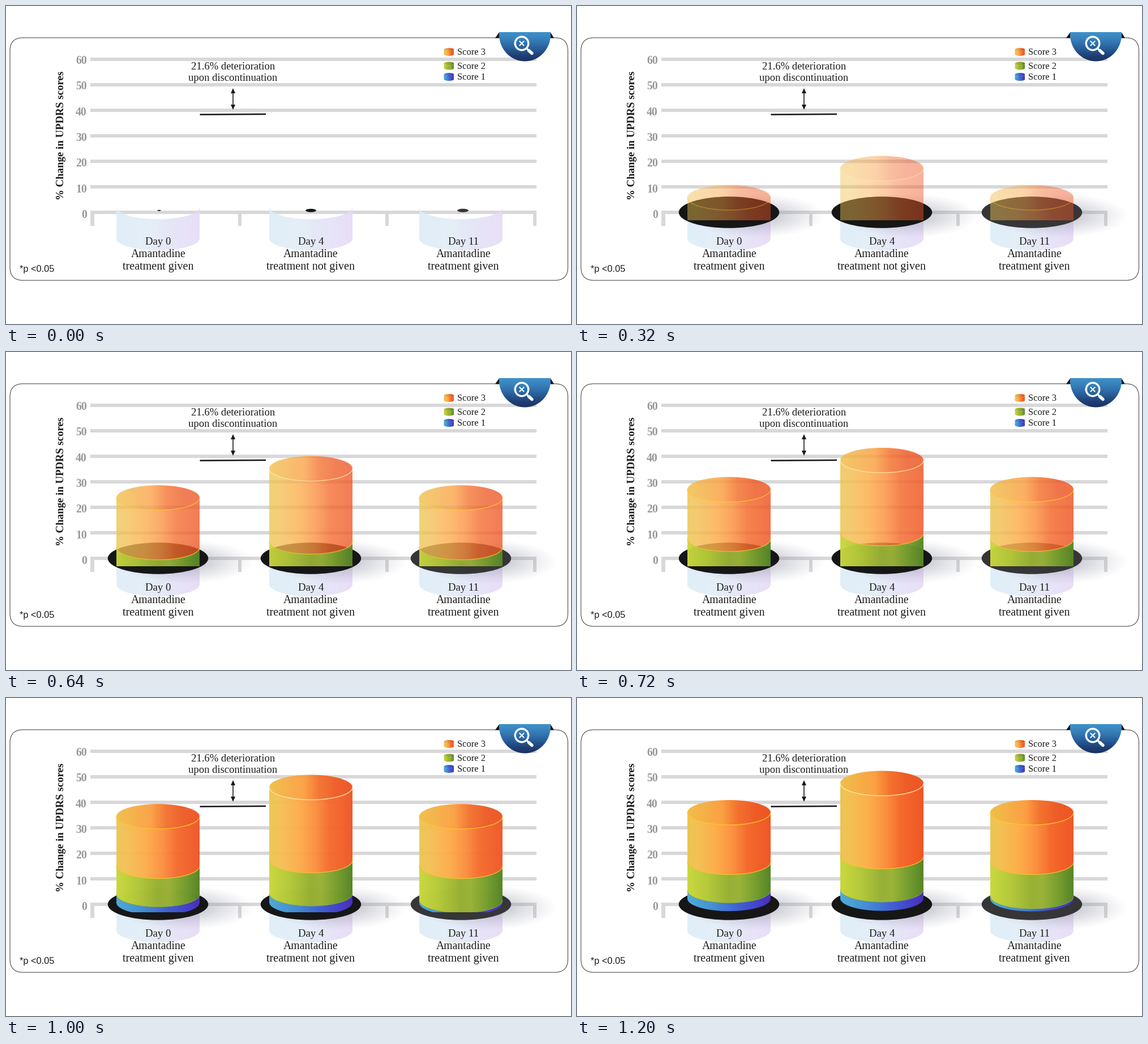
Animation, 998 px wide and 561 px high, one loop 8000 ms. Source, as a matplotlib script:

```python
import numpy as np
import matplotlib.pyplot as plt
from matplotlib.animation import FuncAnimation
from matplotlib.colors import LinearSegmentedColormap
from matplotlib.patches import Ellipse, FancyBboxPatch, Polygon, Rectangle
from matplotlib.path import Path

W, H, DPI = 998, 561, 64
PT = 72 / DPI                     # points per pixel
STEP, LOOP, RISE = 40, 8000, 1200
FLOOR = 378                       # bars are cut off below this line
HALF, TILT = 73.5, 22             # radii of a bar's ellipse
LIFT = 253                        # how far the bars travel
GRID = "#d8d8d9"
INK = "#1b1a1b"

fig = plt.figure(figsize=(W / DPI, H / DPI), dpi=DPI, facecolor="white")
ax = fig.add_axes([0, 0, 1, 1])
ax.set_xlim(0, W)
ax.set_ylim(H, 0)
ax.set_autoscale_on(False)
ax.axis("off")


def ramp(*stops):
    """A one-row RGB gradient from (position, colour) stops."""
    cmap = LinearSegmentedColormap.from_list("ramp", stops, N=256)
    return cmap(np.linspace(0, 1, 256))[None, :, :3]


ORANGE = ramp((0, "#ecc650"), (0.12, "#f3c155"), (0.35, "#fdae4b"),
              (0.55, "#fb9040"), (0.72, "#f56b2d"), (1, "#ef5626"))
ORANGE_TOP = ramp((0, "#f0c04a"), (0.2, "#f5b147"), (0.42, "#fba044"),
                  (0.6, "#f4722f"), (0.8, "#ee5c27"), (1, "#ee5524"))
GREEN = ramp((0, "#cad93f"), (0.25, "#b4c93b"), (0.5, "#98b035"),
             (0.62, "#9bb338"), (0.8, "#79a030"), (1, "#568527"))
BLUE = ramp((0, "#4fadd8"), (0.3, "#4590d6"), (0.6, "#3f63d4"),
            (0.85, "#4640cb"), (1, "#4a2fb6"))
MIRROR = ramp((0, "#dcecf6"), (0.4, "#e2ecf8"), (0.65, "#e3e3f6"),
              (1, "#e6daf6"))


def picture(data, left, right, top, bottom, z, **kw):
    return ax.imshow(data, extent=(left, right, bottom, top), aspect="auto",
                     zorder=z, **kw)


def clip(image, pts):
    image.set_clip_path(Path(pts), ax.transData)


def front(cx, cy, half=HALF, tilt=TILT):
    """Front half of an ellipse, left to right."""
    a = np.linspace(np.pi, 0, 60)
    return np.column_stack([cx + half * np.cos(a), cy + tilt * np.sin(a)])


def disc(cx, cy, half=HALF, tilt=TILT):
    a = np.linspace(0, 2 * np.pi, 120)
    return np.column_stack([cx + half * np.cos(a), cy + tilt * np.sin(a)])


def band(cx, upper, lower, half=HALF, tilt=TILT):
    """Visible side of a cylinder between two ellipse centres."""
    return np.vstack([front(cx, upper, half, tilt),
                      front(cx, lower, half, tilt)[::-1]])


def cut(pts):
    return np.column_stack([pts[:, 0], np.minimum(pts[:, 1], FLOOR)])


def label(x, y, text, px, color=INK, ha="center", family="Liberation Serif",
          **kw):
    ax.text(x, y, text, fontsize=px * PT, color=color, ha=ha, va="baseline",
            family=family, zorder=10, **kw)


def line(xs, ys, px, color=INK, z=8, **kw):
    return ax.plot(xs, ys, color=color, lw=px * PT, zorder=z, **kw)[0]


def box(x, y, w, h, color, z=1):
    ax.add_patch(Rectangle((x, y), w, h, fc=color, ec="none", zorder=z))


def draw_panel():
    ax.add_patch(FancyBboxPatch(
        (29, 78), 941.5, 384, boxstyle="round,pad=0,rounding_size=0.01",
        fc="none", ec="none"))
    ax.add_patch(FancyBboxPatch(
        (7, 56), 985.5, 428, boxstyle="round,pad=0,rounding_size=23",
        fc="white", ec="#4a4a4b", lw=1.1 * PT, zorder=0))


def draw_axes():
    for i in range(7):
        box(149.5, 90.7 + 45 * i, 788, 6.5, GRID)
        label(143, 101.7 + 45.4 * i, str(60 - 10 * i), 19.8, "#98989a",
              "right", weight="bold")
    for x in (149.5, 410, 670, 931):
        box(x, 364, 6.5, 24, GRID)
    label(102, 228, "% Change in UPDRS scores", 18.9, rotation=90,
          rotation_mode="anchor", weight="bold")


def draw_note():
    label(401, 112, "21.6% deterioration", 18.6)
    label(401, 132, "upon discontinuation", 18.6)
    line([401, 401], [150, 178], 1.6)
    for tip, d in ((145, 9), (183, -9)):
        ax.add_patch(Polygon([(401, tip), (397, tip + d), (405, tip + d)],
                             fc=INK, ec="none", zorder=8))
    line([342.5, 459], [191.5, 190.8], 2.6, solid_capstyle="butt")
    label(24.5, 469, "*p <0.05", 16.4, ha="left", family="Liberation Sans")


def draw_legend():
    rows = ((81, 86, "Score 3", ORANGE), (105.5, 111, "Score 2", GREEN),
            (125, 130, "Score 1", BLUE))
    for cy, base, text, colors in rows:
        icon = picture(colors, 773.5, 791.5, cy - 9, cy + 9, 6)
        side = band(782.5, cy - 4, cy + 4, 9, 3)
        lid = disc(782.5, cy - 4, 9, 3)
        clip(icon, side)
        top = picture(colors * 0.93, 773.5, 791.5, cy - 9, cy + 9, 6)
        clip(top, lid)
        label(797, base, text, 16.5, ha="left")


def draw_tab():
    for tri in ([(864, 56.5), (871.5, 46), (871.5, 56.5)],
                [(968, 56.5), (961.5, 46), (961.5, 56.5)]):
        ax.add_patch(Polygon(tri, fc="#15161a", ec="none", zorder=6))
    colors = ramp((0, "#4192cb"), (0.25, "#3680ba"), (0.55, "#285f9b"),
                  (0.8, "#1f3f75"), (1, "#1b3162"))
    tab = picture(colors.transpose(1, 0, 2), 871, 962, 46, 98, 7)
    clip(tab, np.vstack([[(871, 46)], front(916.5, 50, 45.5, 47.5),
                         [(962, 46)]]))
    ax.add_patch(Ellipse((911, 66), 23.5, 23.5, fc="none", ec="white",
                         lw=3.4 * PT, zorder=8))
    line([920, 923], [75, 78], 3, "white")
    line([923.5, 929], [78.5, 83.5], 5.5, "white", solid_capstyle="round")
    for s in (1, -1):
        line([907.5, 914.5], [66 - 3.5 * s, 66 + 3.5 * s], 2, "white")


def shadow_data():
    y, x = np.mgrid[-1:1:60j, -1:1:160j]
    r = np.clip(np.hypot(x, y), 0, 1)
    data = np.empty(r.shape + (4,))
    data[..., :3] = (0.56, 0.57, 0.64)
    data[..., 3] = 0.62 * (1 - r) ** 1.15
    return data


class Hole:
    """Dark disc with a soft shadow that opens under a bar."""

    def __init__(self, cx, start_x, start_scale, color):
        self.cx, self.start_x, self.start_scale = cx, start_x, start_scale
        self.shadow = picture(shadow_data(), 0, 1, 0, 1, 3)
        self.disc = Ellipse((cx, 364), 1, 1, fc=color, ec="none", zorder=4)
        ax.add_patch(self.disc)

    def update(self, t):
        p = min(t / 280, 1)
        s = self.start_scale + (1 - self.start_scale) * p
        x = self.start_x + (self.cx - self.start_x) * p
        y = 360.7 + 3.3 * p
        self.disc.set_center((x, y))
        self.disc.set_width(177.5 * s)
        self.disc.set_height(55.5 * s)
        sx, sy = x + 50 * s, y + 6 * s
        self.shadow.set_extent((sx - 122 * s, sx + 122 * s,
                                sy + 40 * s, sy - 40 * s))
        self.shadow.set_alpha(p)


class Bar:
    """Stacked cylinder; levels are ellipse centres from top to bottom."""

    def __init__(self, cx, levels, rim):
        self.cx, self.levels = cx, np.array(levels)
        span = (cx - HALF - 1, cx + HALF + 1, 100, FLOOR + 2)
        self.lid = picture(ORANGE_TOP, *span, 5)
        self.sides = [picture(c, *span, 5) for c in (ORANGE, GREEN, BLUE)]
        self.rims = [line([], [], w, c, 5.5) for w, c in
                     ((1.3, rim), (1.2, "#f0c22c"), (0.8, "#8fb04a"))]

    def update(self, t):
        left = ((RISE - t) / RISE) ** 2
        fade = 1 - left
        solid = 1 - left ** 2
        y = self.levels + LIFT * left
        self.lid.set_visible(y[0] - TILT < FLOOR)
        self.lid.set_alpha(fade)
        clip(self.lid, cut(disc(self.cx, y[0])))
        for i, (side, rim) in enumerate(zip(self.sides, self.rims)):
            alpha = fade if i == 0 else solid
            side.set_visible(y[i] < FLOOR)
            side.set_alpha(alpha)
            clip(side, cut(band(self.cx, y[i], y[i + 1])))
            arc = front(self.cx, y[i])
            arc[arc[:, 1] > FLOOR] = np.nan
            rim.set_data(arc[:, 0], arc[:, 1])
            rim.set_alpha(alpha)


def draw_reflection(cx):
    image = picture(MIRROR, cx - HALF, cx + HALF, 350, 436, 2, alpha=0.88)
    clip(image, band(cx, 355, 410, HALF, 21))


draw_panel()
draw_axes()
draw_note()
draw_legend()
draw_tab()

CENTERS = (268.5, 538.5, 803.5)
for cx, tx, day, state in zip(CENTERS, (269, 538.5, 808), (0, 4, 11),
                              ("given", "not given", "given")):
    draw_reflection(cx)
    label(tx, 421, f"Day {day}", 18.8)
    label(tx, 443, "Amantadine", 19.8)
    label(tx, 465, f"treatment {state}", 20.1)

actors = [
    Hole(CENTERS[0], 270.5, 0.035, "#161617"),
    Hole(CENTERS[1], 538.5, 0.105, "#161617"),
    Hole(CENTERS[2], 807, 0.11, "#363537"),
    Bar(CENTERS[0], (202, 289.5, 339.5, 354), "#fcc62f"),
    Bar(CENTERS[1], (150.5, 279.5, 338, 353.5), "#ffe9a8"),
    Bar(CENTERS[2], (202, 289.5, 350, 354.5), "#fcc62f"),
]


def update(i):
    t = min(i * STEP, RISE)
    for actor in actors:
        actor.update(t)
    return []


anim = FuncAnimation(fig, update, frames=LOOP // STEP, interval=STEP,
                     init_func=lambda: update(0), repeat=True,
                     repeat_delay=0, blit=False)
plt.show()
```
